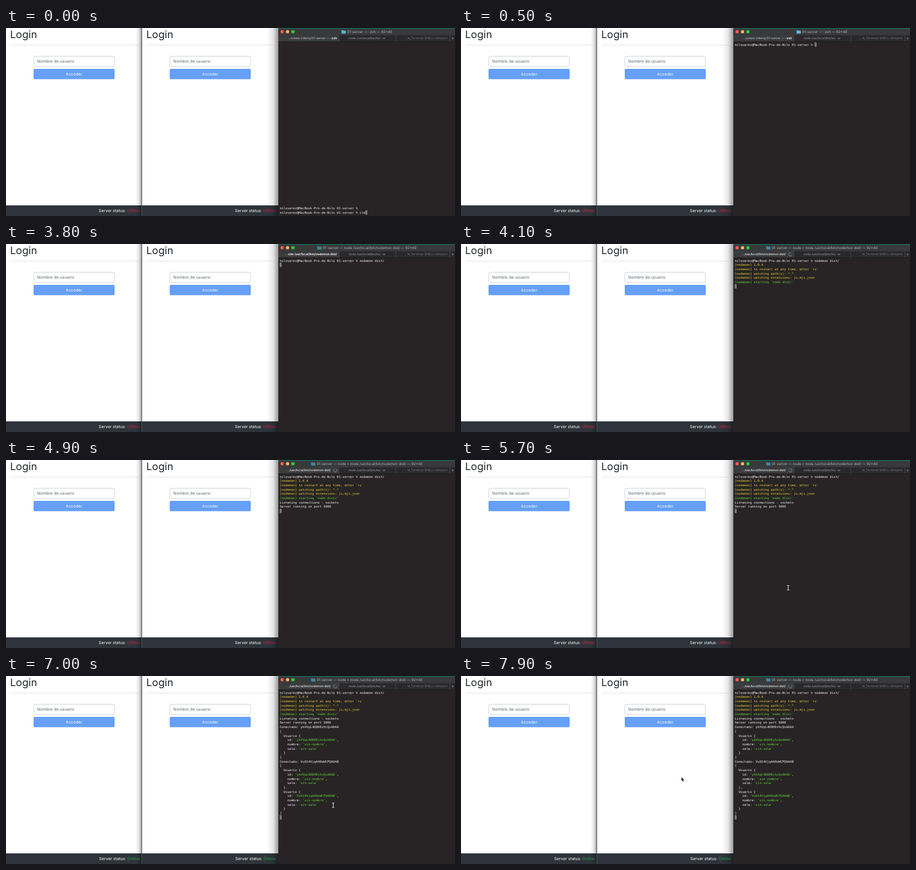
These frames come from a looping animation (798x336 px, 8000 ms). An HTML page with a canvas:

```html
<!DOCTYPE html>
<html lang="es">
<head>
<meta charset="utf-8">
<title>Login y terminal</title>
<style>
html, body { margin: 0; width: 100%; height: 100%; overflow: hidden; background: #fff; }
canvas { display: block; width: 798px; height: 336px; }
</style>
</head>
<body>
<canvas id="stage" width="798" height="336"></canvas>
<script>
const ctx = document.getElementById('stage').getContext('2d');
const LOOP = 8000, TICK = 100;
const SANS = 'Inter, "Open Sans", sans-serif';
const MONO = '"DejaVu Sans Mono", "Liberation Mono", monospace';
const CELL = { x: 486.4, y: 25.6, w: 3.383, h: 7.7 };
const PROMPT = 'nilovarez@MacBook-Pro-de-Nilo 01-server % ';
const WHITE = '#f4f4f4', YELLOW = '#e6cf2e', GREEN = '#62d436';

const NODEMON = [
  '[nodemon] 2.0.4',
  '[nodemon] to restart at any time, enter `rs`',
  '[nodemon] watching path(s): *.*',
  '[nodemon] watching extensions: js,mjs,json',
  '[nodemon] starting `node dist/`'
];
const LISTENING = ['Listening connections - sockets', 'Server running on port 5000'];
const IDS = ['ykXVpL4DDHEvhcQxAAAA', 'VuO14VjqA40oWCPQAAAB'];

function rect(x, y, w, h, color) {
  ctx.fillStyle = color;
  ctx.fillRect(x, y, w, h);
}

function roundRect(x, y, w, h, r, fill, stroke) {
  ctx.beginPath();
  ctx.roundRect(x, y, w, h, r);
  if (fill) { ctx.fillStyle = fill; ctx.fill(); }
  if (stroke) { ctx.strokeStyle = stroke; ctx.lineWidth = 1; ctx.stroke(); }
}

function dot(x, y, r, color) {
  ctx.fillStyle = color;
  ctx.beginPath();
  ctx.arc(x, y, r, 0, 7);
  ctx.fill();
}

// Laid out at ten times the size so small text keeps fractional advances.
function text(str, x, y, size, color, { align = 'left', weight = 400, family = SANS } = {}) {
  ctx.save();
  ctx.translate(x, y);
  ctx.scale(0.1, 0.1);
  ctx.font = `${weight} ${size * 10}px ${family}`;
  ctx.textRendering = 'geometricPrecision';
  ctx.textAlign = align;
  ctx.fillStyle = color;
  ctx.fillText(str, 0, 0);
  const width = ctx.measureText(str).width / 10;
  ctx.restore();
  return width;
}

function edgeShadow(x, w, alpha) {
  const g = ctx.createLinearGradient(x - w, 0, x, 0);
  g.addColorStop(0, 'rgba(0,0,0,0)');
  g.addColorStop(0.55, `rgba(0,0,0,${alpha * 0.25})`);
  g.addColorStop(1, `rgba(0,0,0,${alpha})`);
  rect(x - w, 0, w, 336, g);
}

function drawBrowser(x, online) {
  rect(x, 0, 242, 336, '#fff');
  text('Login', x + 7.2, 18.3, 18.4, '#212529');
  rect(x + 8, 30, 227, 1, '#e4e4e4');
  roundRect(x + 49.5, 50.5, 143, 18, 2, '#fff', '#ced2d6');
  text('Nombre de usuario', x + 55, 62.2, 7.35, '#62686e');
  roundRect(x + 49, 73, 144, 18.5, 2, '#659ff8');
  text('Acceder', x + 121, 85.2, 7.35, '#fff', { align: 'center' });
  rect(x, 317, 242, 19, '#2f343c');
  const status = online ? 'Online' : 'Offline';
  const color = online ? '#28a745' : '#cf2440';
  const width = text(status, x + 238, 329.2, 7.35, color, { align: 'right' });
  text('Server status: ', x + 238 - width, 329.2, 7.35, '#fff', { align: 'right' });
}

function userLines(id, comma) {
  return ['  Usuario {', `    id: '${id}',`, "    nombre: 'sin-nombre',",
    "    sala: 'sin-sala'", '  }' + comma];
}

function connectionLines(count) {
  const users = IDS.slice(0, count);
  return [`Conectado: ${IDS[count - 1]}`, '[',
    ...users.flatMap((id, i) => userLines(id, i < count - 1 ? ',' : '')), ']'];
}

function terminalLines(t) {
  if (t < 500) {
    const typed = t < 300 ? 'cle' : t < 400 ? 'clea' : 'clear';
    return [...Array(38).fill(''), PROMPT, PROMPT + typed];
  }
  if (t < 1300) return [PROMPT];
  if (t < 2800) return [PROMPT + 'clear'];
  const lines = [PROMPT + 'nodemon dist/'];
  if (t < 3700) return lines;
  if (t >= 4000) lines.push(...NODEMON);
  if (t >= 4600) lines.push(...LISTENING);
  if (t >= 6800) lines.push(...connectionLines(1));
  if (t >= 6900) lines.push(...connectionLines(2));
  return [...lines, ''];
}

function drawLine(line, row) {
  const base = line.startsWith('[nodemon] starting') ? GREEN
    : line.startsWith('[nodemon]') ? YELLOW : WHITE;
  let quoted = false;
  [...line].forEach((ch, col) => {
    const quote = ch === "'";
    const color = quoted || quote ? GREEN : base;
    if (quote) quoted = !quoted;
    if (ch !== ' ') {
      text(ch, CELL.x + col * CELL.w, CELL.y + row * CELL.h + 5.9, 5.62, color, { family: MONO });
    }
  });
}

function drawTitle(t) {
  const command = t < 3800 ? '-zsh'
    : (t < 4100 ? '' : 'node • ') + 'node /usr/local/bin/nodemon dist/';
  const width = text(`01-server — ${command} — 92×40`, 646.3, 9.2, 6.2, '#b9b9ba', { align: 'center' });
  const x = 646.3 - width / 2 - 9.8;
  const color = t < 3800 ? '#55b4df' : '#41819a';
  rect(x, 4, 3.4, 2, color);
  roundRect(x, 4.8, 7.5, 5.2, 0.6, color);
}

function drawTabs(t) {
  rect(484, 13, 314, 11.5, '#29292b');
  rect(484, 13, 107.5, 11.5, '#3a3b3d');
  [591.5, 692.5, 788.5].forEach(x => rect(x, 13, 0.8, 11.5, '#505153'));
  rect(484, 24, 314, 0.8, '#1b1a1b');

  if (t < 3800) {
    const width = text('-zsh', 588.3, 20, 5.4, '#f5f5f5', { align: 'right', weight: 700 });
    text('…ockets Udemy/01-server — ', 588.3 - width, 20, 5.4, '#c4c4c5', { align: 'right' });
  } else if (t < 4100) {
    text('…ode /usr/local/bin/nodemon dist/', 588.3, 20, 5.4, '#f5f5f5', { align: 'right', weight: 700 });
  } else {
    text('…/usr/local/bin/nodemon dist/', 577.3, 20, 5.4, '#f0f0f0', { align: 'right', weight: 500 });
    drawSpinner(t);
  }
  text('node /usr/local/bin/tsc -w', 641.5, 20, 5.35, '#a2a2a3', { align: 'center' });
  text('…le_Terminal SHELL=/bin/zsh', 784.6, 20, 5.4, '#7b7b7c', { align: 'right' });
  text('+', 794, 20.6, 8, '#a0a0a1', { align: 'center' });
}

function drawSpinner(t) {
  const turn = t / 1000 * Math.PI * 2;
  ctx.lineWidth = 0.9;
  ctx.strokeStyle = '#56575a';
  ctx.beginPath();
  ctx.arc(585.3, 18.4, 3, 0, 7);
  ctx.stroke();
  ctx.strokeStyle = '#8c8d90';
  ctx.beginPath();
  ctx.arc(585.3, 18.4, 3, turn, turn + 4.4);
  ctx.stroke();
}

function drawTerminal(t) {
  rect(484, 0, 314, 336, '#282425');
  rect(484, 0, 314, 13, '#38393b');
  rect(484, 0, 314, 1.4, '#17695a');
  dot(490.8, 6.7, 2.9, '#fb5a55');
  dot(500.4, 6.7, 2.9, '#fcbb40');
  dot(510, 6.7, 2.9, '#34c648');
  drawTitle(t);
  drawTabs(t);

  const lines = terminalLines(t);
  const last = lines.length - 1;
  rect(CELL.x + lines[last].length * CELL.w, CELL.y + last * CELL.h, 3.5, CELL.h, '#7d7a7b');
  lines.forEach(drawLine);
}

function strokePath(points, width, color) {
  ctx.beginPath();
  points.forEach(([x, y]) => ctx.lineTo(x, y));
  ctx.lineWidth = width;
  ctx.strokeStyle = color;
  ctx.stroke();
}

function drawIBeam(x, y) {
  for (const [width, color] of [[2, '#1a1819'], [1, '#f2f2f2']]) {
    strokePath([[x, y - 4], [x, y + 4]], width, color);
    for (const end of [-4, 4]) strokePath([[x - 2, y + end], [x + 2, y + end]], width, color);
  }
}

function drawArrow(x, y) {
  ctx.beginPath();
  [[0, 0], [0, 6.6], [1.5, 5.3], [2.5, 7.6], [3.6, 7.1], [2.6, 4.9], [4.5, 4.7]]
    .forEach(([dx, dy]) => ctx.lineTo(x + dx, y + dy));
  ctx.closePath();
  ctx.lineWidth = 1;
  ctx.strokeStyle = '#fff';
  ctx.stroke();
  ctx.fillStyle = '#000';
  ctx.fill();
}

function drawPointer(t) {
  if (t < 5700) return;
  const p = Math.min(1, Math.max(0, (t - 7500) / 400));
  const ease = p * p * (3 - 2 * p);
  const x = 581.5 - 189.5 * ease;
  const y = (t < 5800 ? 228.5 : 231) - 50 * ease;
  if (x > 484) drawIBeam(x, y);
  else drawArrow(x, y);
}

function render(t) {
  drawBrowser(0, t >= 6800);
  edgeShadow(241, 11, 0.38);
  drawBrowser(242, t >= 6900);
  rect(241, 0, 1, 336, '#55585b');
  edgeShadow(484, 20, 0.4);
  drawTerminal(t);
  drawPointer(t);
}

function frame() {
  const t = performance.now() % LOOP;
  render(Math.floor(t / TICK) * TICK);
  requestAnimationFrame(frame);
}
frame();
</script>
</body>
</html>
```
